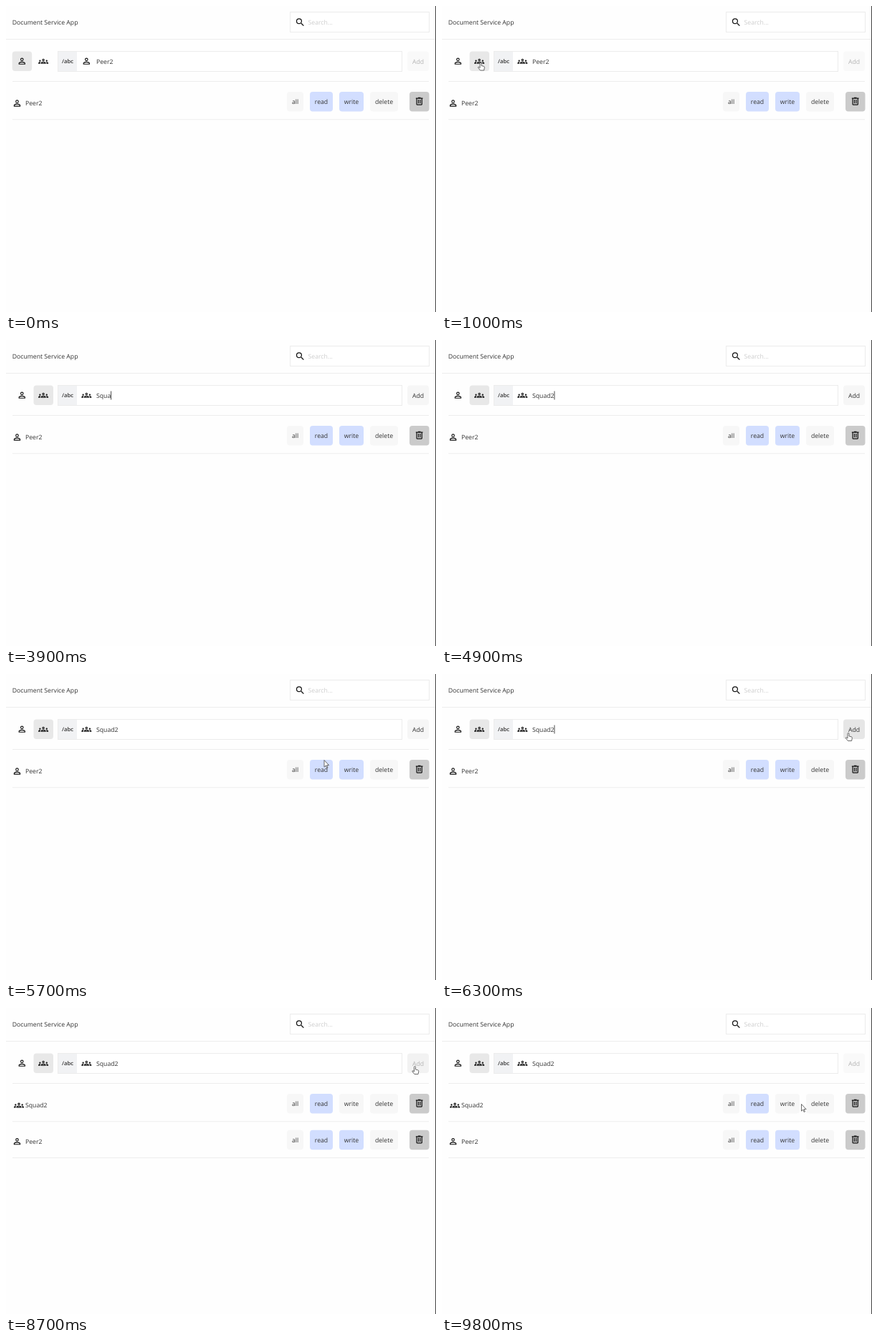
An HTML page that plays this animation: 600x428 px, repeating every 9.9 s.

```html
<!DOCTYPE html>
<html lang="en">
<head>
<meta charset="utf-8">
<title>Document Service App</title>
<style>
  html, body { margin: 0; width: 100%; height: 100%; overflow: hidden; background: #fefefe; }
  svg { display: block; width: 600px; height: 428px; }
  text { font: 8.7px "Open Sans", "Noto Sans", sans-serif; fill: #333; text-rendering: geometricPrecision; white-space: pre; }
  .icon { fill: #111; fill-rule: evenodd; }
  .cursor { fill: #fff; stroke: #444; stroke-width: .8; stroke-linejoin: round; }
</style>
</head>
<body>
<svg id="stage" viewBox="0 0 600 428"></svg>
<script>
const LOOP = 9900, STEP = 100;
const USER = "Peer2", GROUP = "Squad2";
const CLICK_GROUP = 1000, SELECT = 2100, CLICK_ADD = 6700, ROW_ADDED = 7400;
const KEYS = [3200, 3600, 3700, 3900, 4600, 4900];

const ICONS = {
  user: "M12 5.9a2.1 2.1 0 110 4.2 2.1 2.1 0 010-4.2m0 9c2.97 0 6.1 1.46 6.1 2.1v1.1H5.9V17c0-.64 3.13-2.1 6.1-2.1M12 4a4 4 0 100 8 4 4 0 000-8zm0 9c-2.67 0-8 1.34-8 4v3h16v-3c0-2.66-5.33-4-8-4z",
  group: "M4 13a2 2 0 100-4 2 2 0 000 4zm1.13 1.1c-.37-.06-.74-.1-1.13-.1-.99 0-1.93.21-2.78.58A2.01 2.01 0 000 16.43V18h4.5v-1.61c0-.83.23-1.61.63-2.29zM20 13a2 2 0 100-4 2 2 0 000 4zm4 3.43c0-.81-.48-1.53-1.22-1.85A6.95 6.95 0 0020 14c-.39 0-.76.04-1.13.1.4.68.63 1.46.63 2.29V18H24zM16.24 13.65c-1.17-.52-2.61-.9-4.24-.9s-3.07.39-4.24.9A2.99 2.99 0 006 16.39V18h12v-1.61c0-1.18-.68-2.26-1.76-2.74zM8.07 16c.09-.23.13-.39.91-.69a8.3 8.3 0 016.04 0c.77.3.81.46.91.69zM12 8a1 1 0 110 2 1 1 0 010-2m0-2a3 3 0 100 6 3 3 0 000-6z",
  search: "M15.5 14h-.79l-.28-.27A6.47 6.47 0 0016 9.5 6.5 6.5 0 109.5 16c1.61 0 3.09-.59 4.23-1.57l.27.28v.79l5 4.99L20.49 19zm-6 0a4.5 4.5 0 110-9 4.5 4.5 0 010 9z",
  trash: "M15 4V3H9v1H4v2h1v13c0 1.1.9 2 2 2h10c1.1 0 2-.9 2-2V6h1V4zm2 15H7V6h10zM9 8h2v9H9zm4 0h2v9h-2z"
};
const ARROW = "M0 0V9.6L2.2 7.6 3.7 11 5 10.4 3.6 7.1H6.6Z";
const HAND = "M-1 1a1 1 0 012 0V4.5l3.2.8q1.3.4 1.1 1.8L4.6 11H-.6L-3.6 7.2q-.2-1.2 1-.9L-1 7.5Z";

// Pointer paths: [ms, x, y]; the pointer is hidden outside them
const PATHS = [
  [[700, 90, 84], [800, 66, 82], [900, 55, 79], [1000, 54, 79], [1100, 65, 82]],
  [[5600, 395, 110], [5700, 444, 120.5], [5900, 510, 112], [6100, 552, 97], [6300, 567, 82.5],
   [6500, 570.5, 81.5], [9300, 570.5, 81.5], [9400, 566, 92], [9600, 535, 118], [9800, 501.5, 134.5]]
];

const stage = document.getElementById("stage");

const rect = (x, y, w, h, fill, extra = "") =>
  `<rect x="${x}" y="${y}" width="${w}" height="${h}" fill="${fill}" ${extra}/>`;
const label = (x, y, s, extra = "") => `<text x="${x}" y="${y}" ${extra}>${s}</text>`;
const icon = (name, cx, cy, size = 14) =>
  `<path class="icon" d="${ICONS[name]}" transform="translate(${cx - size / 2} ${cy - size / 2}) scale(${size / 24})"/>`;
const rule = (y, x = 9, w = 581) => rect(x, y, w, 1, "#ededed");
const button = (x, y, w, fill, s = "", color = "#333") =>
  rect(x, y, w, 27.5, fill, 'rx="4"') +
  label(x + w / 2, y + 17, s, `text-anchor="middle" style="fill:${color}"`);

function pointerAt(t) {
  for (const path of PATHS) {
    const i = path.findIndex(p => p[0] >= t);
    if (i < 0 || t < path[0][0]) continue;
    const [t1, x1, y1] = path[i], [t0, x0, y0] = path[Math.max(0, i - 1)];
    const k = t1 > t0 ? (t - t0) / (t1 - t0) : 1;
    return { x: x0 + (x1 - x0) * k, y: y0 + (y1 - y0) * k };
  }
  return null;
}

function row(y, kind, name, granted) {
  const rights = [["all", 392, 23], ["read", 424, 32], ["write", 465, 34], ["delete", 508, 39]];
  return icon(kind, kind === "user" ? 15.5 : 18, y + 16) + label(27, y + 19.3, name) +
    rights.map(([s, x, w]) => button(x, y, w, granted.includes(s) ? "#d2deff" : "#f7f7f7", s)).join("") +
    button(563, y, 27.5, "#cbcbcb") + icon("trash", 576.7, y + 13.3, 14.5) + rule(y + 38.3);
}

function toolbar(t, pointer) {
  const kind = t < CLICK_GROUP ? "user" : "group";
  const over = (x, w) => pointer && pointer.x >= x && pointer.x <= x + w && pointer.y < 91;
  const typed = KEYS.filter(k => t >= k);
  const text = typed.length ? GROUP.slice(0, typed.length) : USER;
  const selected = t >= SELECT && !typed.length;
  const enabled = typed.length && t < CLICK_ADD;
  const chip = (name, x) =>
    button(x, 63.5, 27.5, kind === name ? "#e8e8e8" : over(x, 27) ? "#f2f2f2" : "none") + icon(name, x + 13.6, 77.2);
  const addFill = over(560, 30) ? (enabled ? "#e6e6e6" : "#f2f2f2") : enabled ? "#f6f6f6" : "#f9f9f9";
  return chip("user", 8.7) + chip("group", 38.5) +
    rect(72.5, 63.5, 480, 28, "#fff", 'stroke="#ececec"') + rect(73, 64, 26, 27, "#f1f2f4") +
    label(78, 80.3, "/abc", 'style="font-size:7.7px;font-weight:600"') + icon(kind, 112.3, 77.2) +
    (selected ? rect(126, 71, 23.5, 12.5, "#3a8ff5") : "") +
    label(126, 80.6, text, `id="field" style="fill:${selected ? "#fff" : "#333"}"`) +
    button(560, 63.5, 30, addFill, "Add", enabled ? "#333" : "#b4b4b4");
}

function caretOn(t) {
  const last = KEYS.filter(k => t >= k).pop();
  return last && t < CLICK_ADD && Math.floor((t - last + 30) / 530) % 2 === 0;
}

function draw(t) {
  const pointer = pointerAt(t), added = t >= ROW_ADDED;
  const hand = pointer && pointer.y < 91 && (pointer.x >= 560 || pointer.x < 67);
  stage.innerHTML =
    label(8.7, 26.3, "Document Service App") +
    rect(396.5, 8.5, 194, 28, "#fff", 'stroke="#ececec"') + icon("search", 410.5, 22.8, 15) +
    label(421.5, 26.3, "Search...", 'style="fill:#cdcdcd"') +
    rule(46, 0, 599) + toolbar(t, pointer) + rule(105) +
    (added ? row(120, "group", GROUP, ["read"]) : "") +
    row(added ? 170.7 : 120, "user", USER, ["read", "write"]) +
    rect(599, 0, 1, 428, "#444");
  if (caretOn(t)) {
    const x = 126 + document.getElementById("field").getComputedTextLength();
    stage.insertAdjacentHTML("beforeend", rect(x, 71.5, .8, 12, "#222"));
  }
  if (pointer) stage.insertAdjacentHTML("beforeend",
    `<path class="cursor" d="${hand ? HAND : ARROW}" transform="translate(${pointer.x} ${pointer.y})"/>`);
}

const start = performance.now();
let shown = -1;
function tick() {
  const t = Math.floor((performance.now() - start) % LOOP / STEP) * STEP;
  if (t !== shown) draw(shown = t);
  requestAnimationFrame(tick);
}
tick();
</script>
</body>
</html>
```
